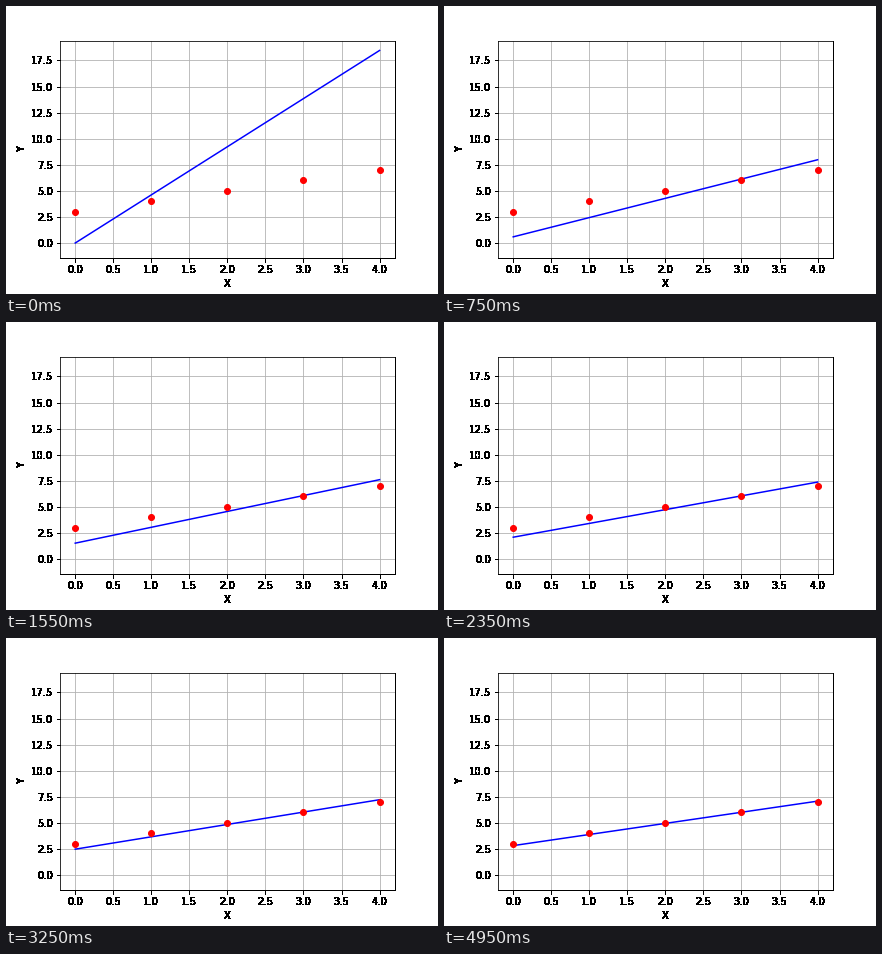
Recreate the animation shown at these times as a matplotlib script. Size 432x288 px, loop 5000 ms.

```python
import numpy as np
import matplotlib.pyplot as plt
from matplotlib.animation import FuncAnimation

FRAMES = 100
INTERVAL = 50
RATE = 0.1
START = (4.618, -0.01)  # slope, intercept

x = np.arange(5)
y = x + 3


def descend(slope, intercept, steps):
    """Fitted line values at x for each gradient descent step."""
    fits = []
    for _ in range(steps):
        fit = slope * x + intercept
        fits.append(fit)
        error = fit - y
        slope -= RATE * np.mean(error * x)
        intercept -= RATE * np.mean(error)
    return np.array(fits)


def harden(image, dpi):
    """Turn soft edges into solid pixels."""
    solid = np.array(image)
    solid[..., 3] = solid[..., 3] > 0
    return solid, 0, 0


fits = descend(*START, FRAMES)
low, high = fits.min(), fits.max()
pad = 0.05 * (high - low)

plt.rcParams["font.family"] = "DejaVu Sans"
fig, ax = plt.subplots(figsize=(6, 4), dpi=72, facecolor="white")
fig.subplots_adjust(left=0.125, right=0.9, bottom=0.125, top=0.88)
ax.set_xlim(-0.2, 4.2)
ax.set_ylim(low - pad, high + pad)
ax.set_xticks(np.arange(0, 4.1, 0.5))
ax.set_yticks(np.arange(0, 17.6, 2.5))
ax.set_xlabel("X")
ax.set_ylabel("Y")
ax.grid(True)

line, = ax.plot(x, fits[0], "b-")
ax.plot(x, y, "ro")

hard = [ax.spines["bottom"], ax.spines["right"]]
for axis in (ax.xaxis, ax.yaxis):
    hard += [axis.label, *axis.get_ticklabels(), *axis.get_ticklines()]
for artist in hard:
    artist.set_agg_filter(harden)


def update(i):
    line.set_ydata(fits[i])
    return line,


anim = FuncAnimation(fig, update, frames=FRAMES, interval=INTERVAL,
                     repeat=True, repeat_delay=0)
plt.show()
```
